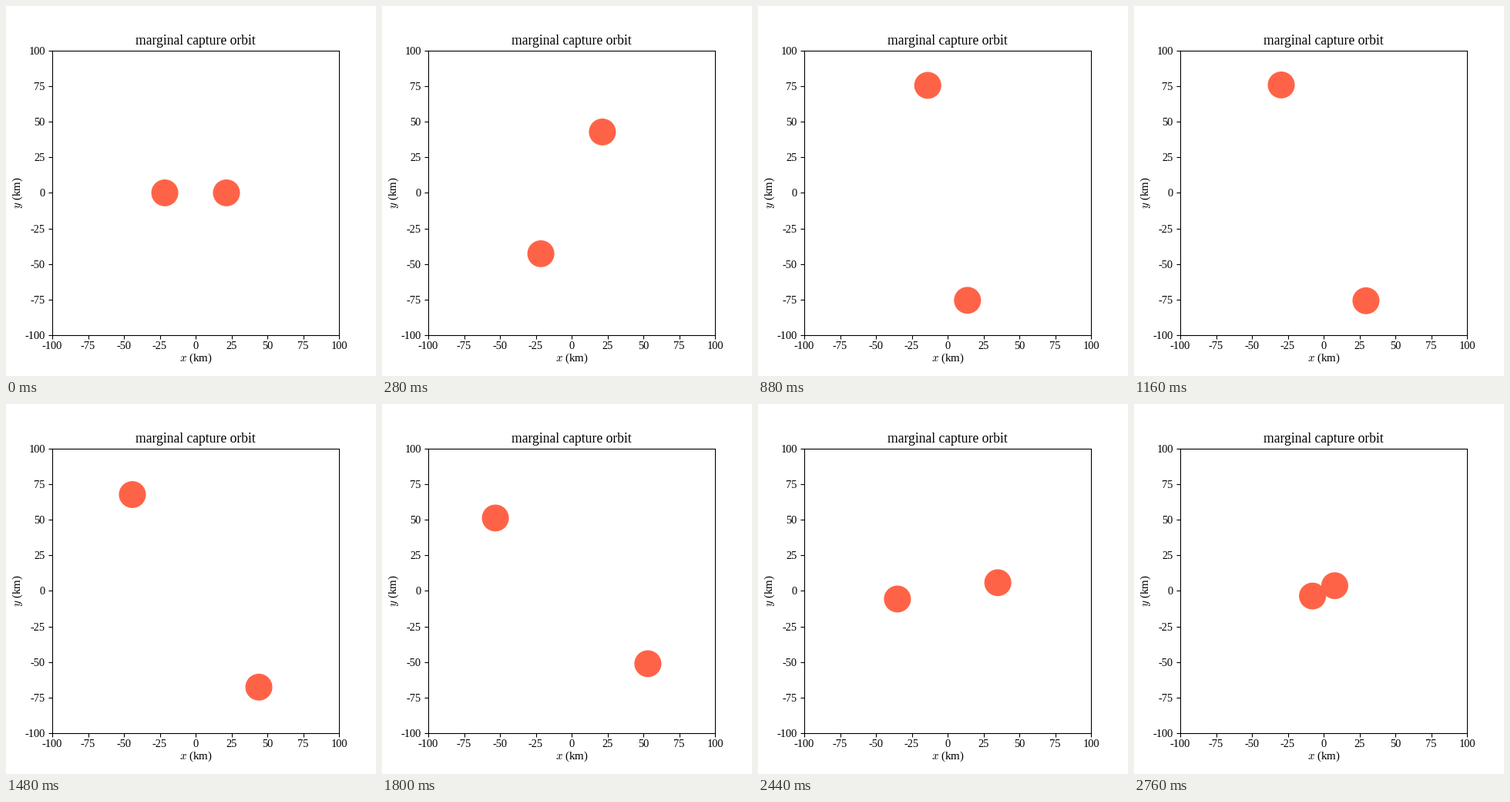
These frames come from a looping animation (480 by 480 pixels, 2800 ms). A matplotlib script:

```python
import numpy as np
import matplotlib.pyplot as plt
from matplotlib.animation import FuncAnimation

plt.rcParams.update({
    "font.family": "Liberation Serif",
    "mathtext.fontset": "cm",
    "axes.unicode_minus": False,
})

SIZE = 480
FRAMES = 70
TURN = 189.3    # polar angle where the final plunge begins, degrees
END = 385.2     # polar angle in the last frame


def inverse_radius(deg):
    """Kepler ellipse plus the orbital decay near both close passes (1/km)."""
    a = np.radians(deg)
    ellipse = 0.03358 + 0.009443 * np.cos(a) - 0.01923 * np.sin(a)
    return ellipse + 0.0035 * np.exp(-deg / 25) + 0.083 * (deg / END) ** 6.5


def orbit():
    """Positions of one body per frame; the other one is its mirror image."""
    deg = np.linspace(0, END, 8001)
    u = inverse_radius(deg)
    # Equal areas in equal times, with angular momentum lost in the plunge.
    momentum = 1 - 0.47 * np.clip((deg - TURN) / (END - TURN), 0, 1)
    rate = 1 / (momentum * u ** 2)
    area = np.concatenate([[0], np.cumsum((rate[1:] + rate[:-1]) / 2)])
    turn_area = np.interp(TURN, deg, area)
    time = np.interp(area, [0, turn_area, area[-1]], [0, 61, FRAMES - 1])
    angle = np.interp(np.arange(FRAMES), time, deg)
    r = 1 / inverse_radius(angle)
    return r * np.cos(np.radians(angle)), r * np.sin(np.radians(angle))


def label(x, y, text, **kw):
    """Text centred on pixel x with its baseline at pixel y from the top."""
    fig.text(x / SIZE, 1 - y / SIZE, text, ha="center", va="baseline",
             rotation_mode="anchor", **kw)


fig = plt.figure(figsize=(4.8, 4.8), dpi=100, facecolor="white")
ax = fig.add_axes([0.125, 0.11, 0.775, 0.77])
ax.set(xlim=(-100, 100), ylim=(-100, 100))
ticks = np.arange(-100, 101, 25)
ax.set_xticks(ticks)
ax.set_yticks(ticks)
ax.tick_params(labelsize=10.4)
ax.tick_params(axis="x", pad=2.2)
ax.tick_params(axis="y", pad=3.2)

label(246, 50, "marginal capture orbit", fontsize=12.7)
label(246, 461, "$x$ (km)", fontsize=10.8)
label(18.6, 242, "$y$ (km)", fontsize=10.8, rotation=90)

xs, ys = orbit()
# Patches keep sub-pixel positions, which markers would round off.
bodies = [ax.add_patch(plt.Circle((0, 0), 9.05, color="tomato"))
          for _ in range(2)]


def draw(i):
    for body, side in zip(bodies, (1, -1)):
        body.center = side * xs[i], side * ys[i]
    return bodies


anim = FuncAnimation(fig, draw, frames=FRAMES, interval=40, repeat=True,
                     repeat_delay=0)
plt.show()
```
